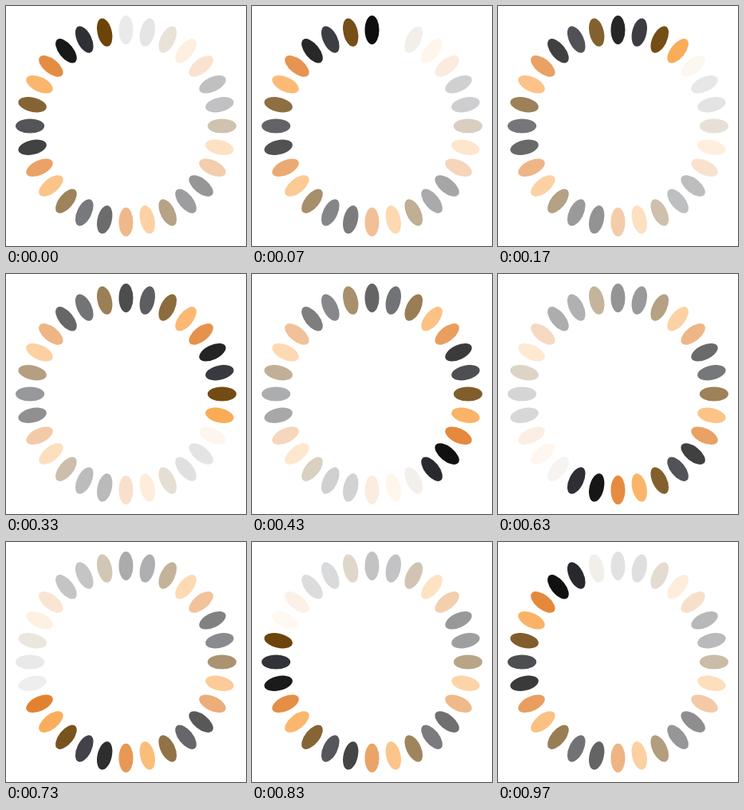
These frames come from a looping animation (301 by 301 pixels, 1000 ms). An HTML page:

```html
<!DOCTYPE html>
<html lang="en">
<head>
<meta charset="utf-8">
<title>Spinner</title>
<style>
  html, body { margin: 0; width: 100%; height: 100%; overflow: hidden; background: #fff; }
  svg { display: block; width: 100%; height: 100%; }
</style>
</head>
<body>
<svg viewBox="0 0 100 100"></svg>
<script>
  const COUNT = 28, LOOP = 1000, STEPS = 30;
  const COLORS = ['#000000', '#222329', '#683e00', '#faa850', '#e17c27'];
  const svg = document.querySelector('svg');

  const petals = Array.from({ length: COUNT }, (_, i) => {
    const el = document.createElementNS('http://www.w3.org/2000/svg', 'ellipse');
    const attrs = {
      cx: 50, cy: 10, rx: 3, ry: 6,
      fill: COLORS[i % COLORS.length],
      transform: `rotate(${i * 360 / COUNT} 50 50)`
    };
    for (const name in attrs) el.setAttribute(name, attrs[name]);
    return svg.appendChild(el);
  });

  // Each petal fades out over one loop; the next one clockwise starts 1/28 later.
  function draw(ms) {
    const tick = Math.floor((ms % LOOP) / 10);
    const t = Math.floor(tick * 0.3 + 0.15) / STEPS;
    petals.forEach((el, i) => {
      const left = 1 - (t + (COUNT - 1 - i) / COUNT) % 1;
      el.setAttribute('opacity', left < 0.005 ? 0 : 0.05 + 0.92 * left);
    });
  }

  const start = performance.now();
  function loop(now) {
    draw(Math.max(0, now - start));
    requestAnimationFrame(loop);
  }
  draw(0);
  requestAnimationFrame(loop);
</script>
</body>
</html>
```
